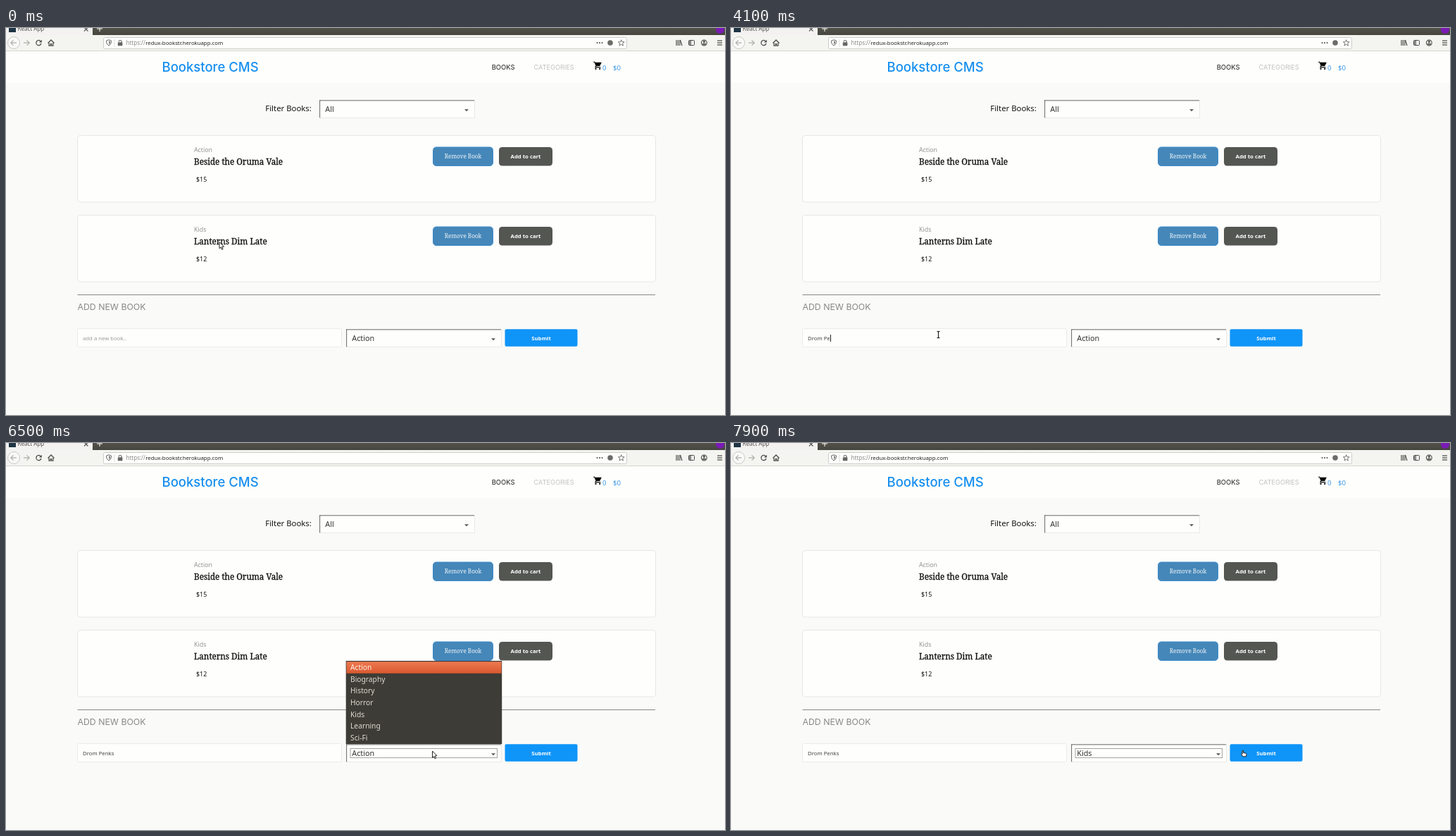
Write an HTML page with a canvas that moves like this. It is 1021x549 px and loops after 8000 ms.

```html
<!DOCTYPE html>
<html lang="en">
<head>
<meta charset="utf-8">
<title>Bookstore CMS</title>
<style>
  html, body { margin: 0; width: 100%; height: 100%; overflow: hidden; background: #fafaf8; }
  canvas { display: block; }
</style>
</head>
<body>
<canvas id="stage" width="1021" height="549"></canvas>
<script>
const ctx = document.getElementById('stage').getContext('2d');
const LOOP = 8000;
const SANS = '"Noto Sans", "Open Sans", sans-serif';
const GEO = 'Inter, sans-serif';
const SLAB = '"Noto Serif", serif';
const BLUE = '#168ff0', WHITE = '#fefefc', PAGE = '#fafaf8', INK = '#4a4a47';
const AUTHOR = 'Drom Penks';
const GENRES = ['Action', 'Biography', 'History', 'Horror', 'Kids', 'Learning', 'Sci-Fi'];

// [start ms, value]; each value holds until the next entry
const POINTER = [
  [0, [303, 303.5, 'arrow']], [100, [303, 320.5, 'arrow']], [400, [303, 322.5, 'arrow']],
  [600, [302, 340, 'arrow']], [700, [299, 374, 'arrow']], [800, [296, 410, 'arrow']],
  [900, [294.5, 435, 'beam']], [2600, [293.5, 433.5, 'arrow']], [3600, [294.5, 435, 'beam']],
  [5100, [335, 433, 'beam']], [5200, [408, 414, 'arrow']], [5300, [470, 398.5, 'arrow']],
  [5700, [604.5, 422, 'arrow']], [6000, [605, 428, 'arrow']], [6100, [605.5, 434, 'arrow']],
  [6200, [605.5, 437, 'arrow']], [6800, [602, 418, 'arrow']], [6900, [598, 400, 'arrow']],
  [7000, [594.5, 382.5, 'arrow']], [7700, [628, 398, 'arrow']], [7800, [690, 426, 'arrow']],
  [7900, [728, 440, 'hand']]
];
const TYPED = [[0, 0], [2600, 1], [2700, 2], [2900, 3], [3500, 4], [3800, 5],
  [4000, 6], [4100, 7], [4300, 8], [4400, 10]];
const CARET = [[0, false], [1200, true], [2400, false], [2600, true], [4800, false],
  [6000, true], [6100, false]];
const HOVER = [[0, 0], [6800, 6], [6900, 5], [7000, 4]];

const at = (steps, t) => steps.filter(s => s[0] <= t).pop()[1];
const during = (t, from, to) => t >= from && t < to;

function text(str, x, y, size, color, family = SANS, weight = 400, align = 'left') {
  ctx.font = `${weight} ${size}px ${family}`;
  ctx.textAlign = align;
  ctx.fillStyle = color;
  ctx.fillText(str, x, y);
}

function rect(x, y, w, h, color) {
  ctx.fillStyle = color;
  ctx.fillRect(x, y, w, h);
}

function box(x, y, w, h, radius, fill, border) {
  ctx.beginPath();
  ctx.roundRect(x, y, w, h, radius);
  paint(fill, border);
}

function circle(x, y, r, fill, border, width) {
  ctx.beginPath();
  ctx.arc(x, y, r, 0, Math.PI * 2);
  paint(fill, border, width);
}

function poly(points, fill, border, width, closed = true) {
  ctx.beginPath();
  points.forEach(([x, y]) => ctx.lineTo(x, y));
  if (closed) ctx.closePath();
  paint(fill, border, width);
}

const line = (points, color = INK, width = 1.2) => poly(points, null, color, width, false);

function paint(fill, border, width = 1) {
  if (fill) { ctx.fillStyle = fill; ctx.fill(); }
  if (border) { ctx.strokeStyle = border; ctx.lineWidth = width; ctx.stroke(); }
}

function placed(x, y, draw, scale = 1) {
  ctx.save();
  ctx.translate(x, y);
  ctx.scale(scale, scale);
  draw();
  ctx.restore();
}

function arrowIcon(x, dir, color) {
  placed(x, 21, () => {
    line([[-4 * dir, 0], [4 * dir, 0]], color);
    line([[0.5 * dir, -3.7], [4.2 * dir, 0], [0.5 * dir, 3.7]], color);
  });
}

function drawTabs() {
  const bar = ctx.createLinearGradient(0, 0, 0, 10);
  bar.addColorStop(0, '#53524a');
  bar.addColorStop(1, '#46453e');
  rect(0, 0, 1021, 10, bar);
  rect(0, 0, 123, 10, '#f3f2f0');
  rect(4, 0, 10, 6, '#1f3444');
  text('React App', 16.5, 4, 8, '#55544f');
  line([[111, -1], [116.5, 4.5]], '#555');
  line([[116.5, -1], [111, 4.5]], '#555');
  line([[129, 1], [137, 1]], '#e6e5df');
  line([[133, 0], [133, 5]], '#e6e5df');
  circle(1014, 2, 6, '#7a1bb5');
}

function drawToolbar() {
  rect(0, 10, 1021, 22, '#f4f4f1');
  rect(0, 32, 1021, 1, '#d5d5d1');
  circle(11, 21, 8.5, '#f9f9f7', '#c9c9c5');
  arrowIcon(11, -1, '#acaca9');
  arrowIcon(29, 1, '#acaca9');

  ctx.beginPath();
  ctx.arc(46.5, 21, 3.6, 0.3, 5.5);
  paint(null, INK, 1.3);
  poly([[50.8, 16.8], [50.8, 20.6], [47, 20.6]], INK);

  line([[59.5, 21.5], [64, 17], [68.5, 21.5]], INK, 1.3);
  line([[61, 21], [61, 25.2], [63.2, 25.2], [63.2, 22.5], [64.8, 22.5], [64.8, 25.2], [67, 25.2], [67, 21]], INK);

  box(138.5, 13.5, 743, 16, 2, WHITE, '#ccccc8');
  poly([[142.5, 18], [146, 16.8], [149.5, 18], [149, 22], [146, 25.2], [143, 22]], null, '#666', 1);
  poly([[146, 18.5], [148, 19], [147.6, 21.8], [146, 23.5]], '#777');
  rect(153.5, 16, 1, 11, '#ddddda');
  box(158.8, 20.3, 6.6, 5, 0.8, '#666');
  ctx.beginPath();
  ctx.arc(162.1, 19.5, 2, Math.PI, 0);
  ctx.lineTo(164.1, 21);
  paint(null, '#666', 1.2);
  text('https://', 170.5, 24, 8, '#8a8a87');
  text('redux-bookstr.herokuapp.com', 198.3, 24, 7.75, '#222');

  [839.5, 843, 846.5].forEach(x => circle(x, 21, 1, INK));
  circle(858, 21, 3.8, '#6b6b68');
  const star = Array.from({ length: 10 }, (_, i) => {
    const r = i % 2 ? 2 : 4.6, a = i * Math.PI / 5 - Math.PI / 2;
    return [873.7 + r * Math.cos(a), 21.3 + r * Math.sin(a)];
  });
  poly(star, null, '#666', 0.9);

  [952, 954.4, 956.8].forEach(x => line([[x, 17], [x, 25]]));
  line([[957.5, 17], [960, 25]]);
  box(969.5, 17.5, 8, 7, 1, null, INK);
  rect(970, 18, 3.2, 6, '#8a8a87');
  circle(991.3, 21, 3.9, null, INK, 1.1);
  circle(991.3, 19.6, 1.5, INK);
  rect(988.8, 21.8, 5, 1.9, INK);
  [18, 21, 24].forEach(y => line([[1010, y], [1017, y]]));
}

function drawCart() {
  placed(833.5, 46.5, () => {
    line([[1, 3], [4, 3], [8, 12.2], [6, 16], [19, 16]], '#000', 2);
    poly([[5, 4], [21.6, 4], [17, 13], [8, 13]], '#000');
    circle(7, 20, 2, '#000');
    circle(17, 20, 2, '#000');
  }, 0.57);
}

function drawHeader() {
  rect(0, 33, 1021, 45, WHITE);
  text('Bookstore CMS', 221.5, 61.7, 18.5, BLUE, GEO, 500);
  text('BOOKS', 689.7, 59.3, 9.4, '#1d1d1b', GEO);
  text('CATEGORIES', 749.5, 59.3, 9.2, '#c2c2bf', GEO);
  drawCart();
  text('0', 847, 60, 9.6, '#3c99e6');
  text('$0', 862, 60, 9.6, '#3c99e6');
}

function drawSelect(x, y, value) {
  rect(x, y, 221, 25.5, '#e9e9e6');
  rect(x, y, 220, 1.3, '#777774');
  rect(x, y, 1.3, 25, '#777774');
  rect(x + 1.3, y + 1.3, 218.7, 23.2, WHITE);
  text(value, x + 8.3, y + 16.9, 10.75, '#333');
  poly([[x + 206, y + 13], [x + 212, y + 13], [x + 209, y + 16]], '#555');
}

function drawBook(y, genre, title, price) {
  box(101.5, y + 0.5, 821, 94.5, 4, WHITE, '#e7e7e4');
  text(genre, 267, y + 24.2, 8.8, '#949491');
  text(title, 267, y + 41.5, 11.7, '#111', SLAB, 500);
  ctx.strokeStyle = '#111';
  ctx.lineWidth = 0.3;
  ctx.strokeText(title, 267, y + 41.5);
  text(price, 270, y + 66, 8.9, '#111');
  box(606.5, y + 17, 85, 26.5, 4.5, '#4587b9', '#3f8ccb');
  text('Remove Book', 649, y + 33.4, 8.1, '#f3f6f8', SLAB, 400, 'center');
  box(700, y + 17, 76, 26.5, 4.5, '#545652');
  text('Add to cart', 738, y + 33.4, 7.75, '#fff', SANS, 700, 'center');
}

function drawForm(t) {
  rect(101.5, 378, 820.5, 1, '#888885');
  text('ADD NEW BOOK', 101.5, 400.4, 12.3, '#888885', GEO);

  box(101.5, 426.5, 375, 26, 2, WHITE, '#ebebe8');
  const typed = AUTHOR.slice(0, at(TYPED, t));
  text(typed || 'add a new book..', 109, 442.8, 7.75, typed ? '#42423f' : '#9b9b98');
  if (at(CARET, t)) rect(Math.round(109 + (typed ? ctx.measureText(typed).width : 0)), 435, 1, 10, '#222');

  drawSelect(483, 427.3, t >= 7700 ? 'Kids' : 'Action');
  if (t >= 6200) {
    ctx.strokeStyle = '#a3a3a0';
    ctx.lineWidth = 1;
    ctx.strokeRect(489, 433.5, 208.5, 13);
  }
  box(708.5, 427.3, 103, 24.5, 2, '#0f94f8');
  text('Submit', 760, 443.3, 7.75, '#fff', SANS, 700, 'center');
}

function drawSuggestion() {
  ctx.save();
  ctx.shadowColor = 'rgba(0,0,0,.35)';
  ctx.shadowBlur = 5;
  ctx.shadowOffsetY = 1;
  rect(101.5, 453, 376, 13, WHITE);
  ctx.restore();
  ctx.strokeStyle = '#b5b5b1';
  ctx.lineWidth = 1;
  ctx.strokeRect(102, 453.5, 375, 12.5);
  text('ksjskjsth', 105.7, 462.5, 7.75, '#42423f');
}

function drawMenu(hovered) {
  const top = 310.2, row = 16.6;
  rect(482.7, 309, 221.5, 118, '#3d3c36');
  const y = top + hovered * row;
  const glow = ctx.createLinearGradient(0, y, 0, y + row);
  glow.addColorStop(0, '#ee7a51');
  glow.addColorStop(1, '#d9582f');
  rect(483.5, y, 220, row, glow);
  GENRES.forEach((name, i) =>
    text(name, 489, top + i * row + 12, 10.25, i === hovered ? '#fff3ea' : '#dfdbd2'));
}

function drawPointer([x, y, kind]) {
  placed(x, y, () => {
    ctx.lineJoin = 'round';
    if (kind === 'arrow') {
      poly([[0, 0], [0, 9.3], [2.1, 7.5], [3.6, 10.8], [5.1, 10.1], [3.6, 6.9], [6.5, 6.7]], '#fff', '#222', 1);
    } else if (kind === 'beam') {
      [['#fff', 2.6], ['#222', 1.2]].forEach(([color, width]) => {
        line([[-2, -4.5], [2, -4.5]], color, width);
        line([[0, -4.5], [0, 4.5]], color, width);
        line([[-2, 4.5], [2, 4.5]], color, width);
      });
    } else {
      poly([[-2, -3.5], [-0.5, -3.5], [-0.3, -0.5], [3.4, 0.2], [4, 1.2], [3.5, 4.8],
        [-1, 4.8], [-3.5, 1.2], [-2.8, 0.4], [-1.8, 1.2]], '#fff', '#222', 1);
    }
  });
}

function draw(t) {
  rect(0, 0, 1021, 549, PAGE);
  drawTabs();
  drawToolbar();
  drawHeader();
  text('Filter Books:', 368.3, 118.3, 11.35, '#151513');
  drawSelect(445, 102.3, 'All');
  drawBook(152, 'Action', 'Beside the Oruma Vale', '$15');
  drawBook(265, 'Kids', 'Lanterns Dim Late', '$12');
  drawForm(t);
  if (during(t, 2600, 3500)) drawSuggestion();
  if (during(t, 6500, 7500)) drawMenu(at(HOVER, t));
  drawPointer(at(POINTER, t));
}

function tick() {
  draw(performance.now() % LOOP);
  requestAnimationFrame(tick);
}
tick();
</script>
</body>
</html>
```
